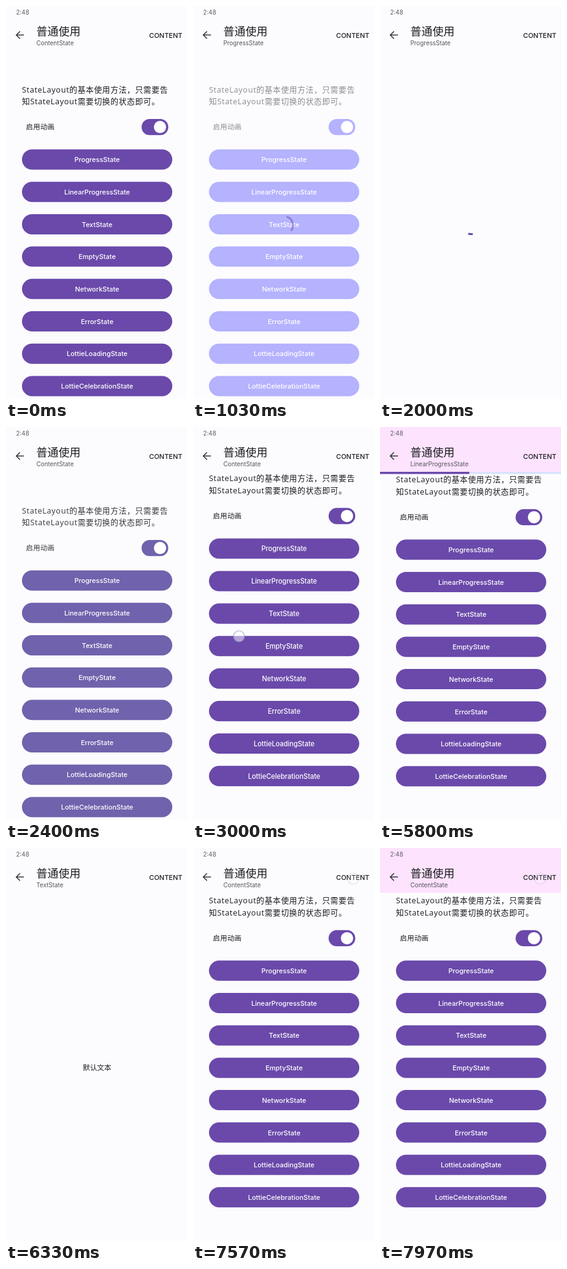
Write an HTML page with a canvas that moves like this. It is 295 px wide and 640 px high and loops after 8 s.

```html
<!DOCTYPE html>
<html lang="zh-CN">
<head>
<meta charset="utf-8">
<title>StateLayout</title>
<style>
html, body { margin: 0; height: 100%; overflow: hidden; background: #fcfcff; }
canvas { display: block; width: 295px; height: 640px; }
</style>
</head>
<body>
<canvas id="stage"></canvas>
<script>
const W = 295, H = 640, LOOP = 8000, HEADER = 73, MAX_SCROLL = 50.2;
const PAPER = [252, 252, 255], TINT = [253, 227, 254], PURPLE = [106, 73, 170];
const UI = 'Inter, "Noto Sans CJK SC", sans-serif';
const BODY = '"Open Sans", "Noto Sans CJK SC", sans-serif';
const BUTTONS = ['Progress', 'LinearProgress', 'Text', 'Empty', 'Network', 'Error',
  'LottieLoading', 'LottieCelebration'];

// Accent colour by opacity of the content
const ACCENT = [[0, PAPER], [.5, [181, 178, 254]], [.87, [112, 100, 172]], [1, PURPLE]];

// Start time of each state and its name
const STATES = [[0, 'Content'], [800, 'Progress'], [2030, 'Content'],
  [3600, 'LinearProgress'], [5840, 'Text'], [7130, 'Content']];

// Taps: start, end, x, y, strength
const TAPS = [[560, 720, 149, 251, 1], [1830, 1980, 261, 50, 1], [3400, 3540, 149, 251, 1],
  [5620, 5770, 149, 306, 1], [6930, 7090, 261, 50, 1], [7090, 8000, 261, 50, .35]];

const canvas = document.getElementById('stage');
const ctx = canvas.getContext('2d');
const ratio = window.devicePixelRatio || 1;
canvas.width = W * ratio;
canvas.height = H * ratio;

const clamp = v => Math.max(0, Math.min(1, v));
const ramp = (t, from, to) => clamp((t - from) / (to - from));
const mix = (a, b, k) => a.map((v, i) => v + (b[i] - v) * k);
const rgb = c => `rgb(${c.map(Math.round)})`;

function accentColor(alpha) {
  const i = Math.max(1, ACCENT.findIndex(([stop]) => alpha <= stop));
  const [from, low] = ACCENT[i - 1], [to, high] = ACCENT[i];
  return rgb(mix(low, high, ramp(alpha, from, to)));
}

function bezier(x1, y1, x2, y2) {
  const at = (s, a, b) => 3 * (1 - s) ** 2 * s * a + 3 * (1 - s) * s * s * b + s ** 3;
  return x => {
    let lo = 0, hi = 1;
    for (let i = 0; i < 20; i++) {
      const mid = (lo + hi) / 2;
      if (at(mid, x1, x2) < x) lo = mid; else hi = mid;
    }
    return at(lo, y1, y2);
  };
}
const standard = bezier(.4, 0, .2, 1);
const firstHead = bezier(.2, 0, .8, 1), firstTail = bezier(.4, 0, 1, 1);
const secondHead = bezier(0, 0, .65, 1), secondTail = bezier(.1, 0, .45, 1);

function text(str, x, y, size, color, { weight = 400, align = 'left', family = UI, spacing = 0 } = {}) {
  ctx.font = `${weight} ${size}px ${family}`;
  ctx.textAlign = align;
  ctx.letterSpacing = spacing + 'px';
  ctx.fillStyle = color;
  ctx.fillText(str, x, y);
}

function pill(x, y, w, h, color) {
  ctx.fillStyle = color;
  ctx.beginPath();
  ctx.roundRect(x, y, w, h, h / 2);
  ctx.fill();
}

function disc(x, y, r, color) {
  ctx.fillStyle = color;
  ctx.beginPath();
  ctx.arc(x, y, r, 0, 7);
  ctx.fill();
}

function contentAlpha(t) {
  if (t < 1500) return 1 - ramp(t, 830, 1230);
  if (t < 5000) return ramp(t, 2050, 2450);
  if (t < 6600) return 1 - ramp(t, 5850, 6250);
  return ramp(t, 7150, 7550);
}

const dragY = t => 445 - 104 * ramp(t, 2580, 3000);

function drawContent(t, alpha) {
  if (!alpha) return;
  const scroll = Math.min(MAX_SCROLL, Math.max(0, 430 - dragY(t)));
  const stretch = .004 * ramp(t, 2860, 3000) * (1 - standard(ramp(t, 3030, 3300)));
  const accent = accentColor(alpha);
  const ink = `rgba(28,27,31,${alpha})`;

  ctx.save();
  ctx.beginPath();
  ctx.rect(0, HEADER, W, H);
  ctx.clip();
  ctx.translate(0, H);
  ctx.scale(1, 1 + stretch);
  ctx.translate(0, -H - scroll);

  const paragraph = { family: BODY, spacing: .6 };
  text('StateLayout的基本使用方法，只需要告', 26, 140.5, 12.8, ink, paragraph);
  text('知StateLayout需要切换的状态即可。', 26, 160.2, 12.8, ink, paragraph);
  text('启用动画', 32.5, 201.3, 11.4, ink, { spacing: .3 });
  pill(221, 184, 43.5, 26.3, accent);
  disc(251, 197.1, 10, '#fff');

  BUTTONS.forEach((name, i) => {
    const y = 250 + i * 52.7;
    pill(26, y - 16.5, 245, 33, accent);
    text(name + 'State', 148.5, y + 4.2, 11, '#fff', { weight: 500, align: 'center' });
  });
  ctx.restore();
}

function drawSpinner(t, alpha) {
  if (!alpha) return;
  const age = t - 830, cycle = Math.floor(age / 1333), phase = age % 1333;
  const base = -111 + age * 1520 / 5400 + cycle * 250;
  const head = base + 250 * standard(ramp(phase, 0, 667));
  const tail = base - 20 + 250 * standard(ramp(phase, 667, 1333));
  ctx.globalAlpha = alpha;
  ctx.strokeStyle = rgb(PURPLE);
  ctx.lineWidth = 3;
  ctx.beginPath();
  ctx.arc(148.5, 357, 14.5, tail * Math.PI / 180, head * Math.PI / 180);
  ctx.stroke();
  ctx.globalAlpha = 1;
}

function drawLinearBar(t, alpha) {
  if (!alpha) return;
  const phase = (t - 2795 + 1800) % 1800;
  const segment = (tail, head) => ctx.fillRect(tail * W, HEADER, (head - tail) * W, 3.5);
  ctx.globalAlpha = alpha;
  ctx.fillStyle = '#d9e2ff';
  ctx.fillRect(0, HEADER, W, 3.5);
  ctx.fillStyle = rgb(PURPLE);
  segment(firstTail(ramp(phase, 333, 1183)), firstHead(ramp(phase, 0, 750)));
  segment(secondTail(ramp(phase, 1267, 1800)), secondHead(ramp(phase, 1000, 1567)));
  ctx.globalAlpha = 1;
}

function drawHeader(t) {
  const tint = ramp(t, 3000, 3200) - ramp(t, 5830, 6030) + ramp(t, 7570, 7750);
  ctx.fillStyle = rgb(mix(PAPER, TINT, tint));
  ctx.fillRect(0, 0, W, HEADER);

  text('2:48', 16.5, 14, 9.8, '#5f5d66');
  ctx.strokeStyle = '#38363d';
  ctx.lineWidth = 1.6;
  ctx.beginPath();
  ctx.moveTo(29.3, 47.3);
  ctx.lineTo(17, 47.3);
  ctx.moveTo(22.8, 41.3);
  ctx.lineTo(16.8, 47.3);
  ctx.lineTo(22.8, 53.3);
  ctx.stroke();

  const state = STATES.filter(([start]) => start <= t).pop()[1];
  text('普通使用', 49.5, 47.7, 18, '#1c1b1f');
  text(state + 'State', 49.5, 63.8, 9.9, '#55535b');
  text('CONTENT', 287.5, 51.8, 11, '#1c1b1f', { weight: 500, align: 'right' });
}

function drawTouch(x, y, strength) {
  ctx.globalAlpha = strength;
  disc(x, y, 9, 'rgba(255,255,255,.5)');
  ctx.strokeStyle = 'rgba(130,135,195,.5)';
  ctx.lineWidth = 1.6;
  ctx.stroke();
  ctx.globalAlpha = 1;
}

function draw(t) {
  ctx.setTransform(ratio, 0, 0, ratio, 0, 0);
  ctx.fillStyle = rgb(PAPER);
  ctx.fillRect(0, 0, W, H);

  const alpha = contentAlpha(t);
  drawContent(t, alpha);
  drawHeader(t);
  if (t > 830 && t < 2450) drawSpinner(t, 1 - alpha);
  drawLinearBar(t, ramp(t, 3620, 3920) - ramp(t, 5850, 6150));
  if (t > 5850) {
    text('默认文本', 148.5, 361.5, 11.6, `rgba(28,27,31,${1 - alpha})`, { align: 'center' });
  }

  for (const [start, end, x, y, strength] of TAPS) {
    if (t >= start && t < end) drawTouch(x, y, strength);
  }
  if (t >= 2560 && t < 3040) drawTouch(75, dragY(t), 1);
}

function tick() {
  draw(performance.now() % LOOP);
  requestAnimationFrame(tick);
}
tick();
</script>
</body>
</html>
```
